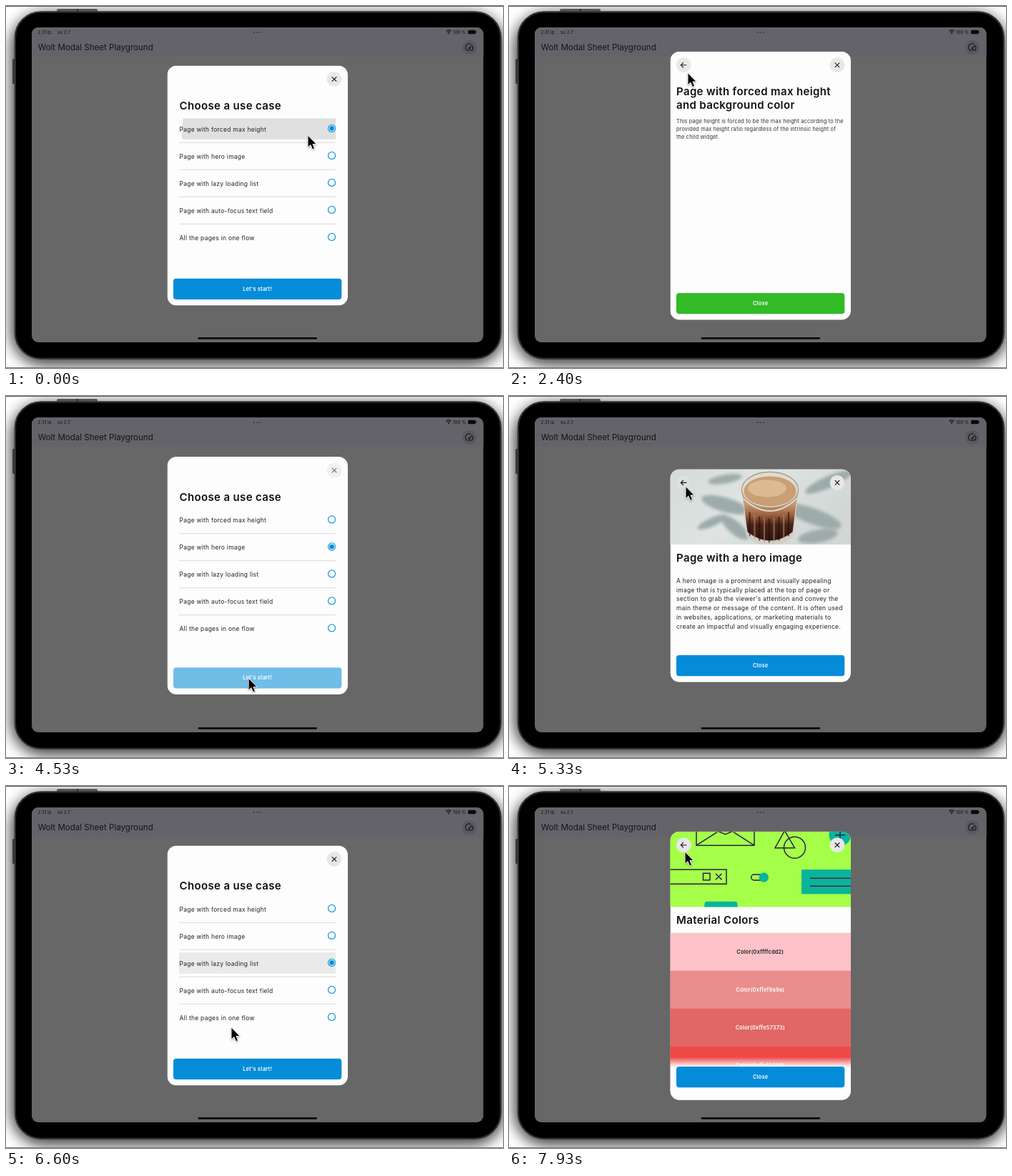
Animation, 695 px wide and 507 px high, one loop 8 s. Source, as an HTML page:

```html
<!DOCTYPE html>
<html lang="en">
<head>
<meta charset="utf-8">
<title>Modal sheet playground</title>
<style>
html, body { margin: 0; width: 100%; height: 100%; overflow: hidden; background: #fff; }
svg { display: block; width: 695px; height: 507px; }
text { font-family: Inter, "Open Sans", sans-serif; fill: #222; white-space: pre; }
.title { font-size: 15px; font-weight: 600; letter-spacing: .36px; fill: #111; }
.body { font-size: 8.45px; letter-spacing: .285px; }
.small { font-size: 7.4px; letter-spacing: .16px; fill: #333; }
.label { font-size: 7.4px; font-weight: 600; letter-spacing: .2px; text-anchor: middle; fill: #fff; }
.status { font-size: 6.2px; fill: #111; }
.ink { fill: none; stroke: #2a2146; stroke-width: 1.5; }
.icon { fill: none; stroke: #111; stroke-width: 1.15; }
</style>
</head>
<body>
<svg id="stage" viewBox="0 0 695 507"></svg>
<script>
const LOOP = 8000, TICK = 1000 / 15;
const LEFT = 225.5, WIDTH = 252.5;
const BLUE = '#048cd8', TEAL = '#08b59b';

// Markup helpers
const rect = (x, y, w, h, fill, r = 0, more = '') =>
  `<rect x="${x}" y="${y}" width="${w}" height="${h}" rx="${r}" fill="${fill}" ${more}/>`;
const circle = (x, y, r, fill, more = '') =>
  `<circle cx="${x}" cy="${y}" r="${r}" fill="${fill}" ${more}/>`;
const oval = (x, y, rx, ry, fill, more = '') =>
  `<ellipse cx="${x}" cy="${y}" rx="${rx}" ry="${ry}" fill="${fill}" ${more}/>`;
const path = (d, cls, more = '') => `<path d="${d}" class="${cls}" ${more}/>`;
const text = (x, y, cls, s, more = '') => `<text x="${x}" y="${y}" class="${cls}" ${more}>${s}</text>`;
const lines = (x, y, step, cls, list) => list.map((s, i) => text(x, y + i * step, cls, s)).join('');

const closeIcon = circle(459, 19, 10.4, '#e7e7e8') + path('M455.8 15.8l6.4 6.4m0-6.4l-6.4 6.4', 'icon');
const backIcon = fill => circle(244.3, 19, 10.4, fill) + path('M248.3 19h-8m3.6-3.6l-3.6 3.6l3.6 3.6', 'icon');
const button = (s, fill, gap = 8.5) =>
  rect(234, -gap - 29.2, 235.3, 29.2, fill, 4) + text(351.6, -gap - 12, 'label', s);

const ROWS = ['Page with forced max height', 'Page with hero image', 'Page with lazy loading list',
  'Page with auto-focus text field', 'All the pages in one flow'];

const listMain = text(242.5, 61.8, 'title', 'Choose a use case') + ROWS.map((s, i) => {
  const y = 38 * i;
  return (i < 3 ? `<clipPath id="row${i}">${rect(242, 73.7 + y, 219, 29.6, '#000')}</clipPath>
    <g clip-path="url(#row${i})">${circle(0, 0, 0, '#000', `id="ripple${i}"`)}</g>` : '') +
    text(242.5, 92 + y, 'body', s) +
    circle(455.5, 87.9 + y, 5, '#fff', 'stroke="#1b9bd7" stroke-width="1.3"') +
    circle(455.5, 87.9 + y, 3.3, BLUE, `id="dot${i}"`) +
    (i < 4 ? rect(242, 107.3 + y, 219, .8, '#cfcfcf') : '');
}).join('');

const forcedMain = lines(234, 61, 19.3, 'title', ['Page with forced max height', 'and background color']) +
  lines(234, 100.7, 10.6, 'small', ['This page height is forced to be the max height according to the',
    'provided max height ratio regardless of the intrinsic height of', 'the child widget.']);

const leaf = (x, y, rx, ry, turn) => oval(x, y, rx, ry, '#9dabaa', `transform="rotate(${turn} ${x} ${y})"`);
const ridges = Array.from({ length: 9 }, (_, i) =>
  rect(335.5 + i * 6.8, 60 + 9 * Math.sin(i * Math.PI / 8), 2.2, 34, i % 2 ? '#b98a6a' : '#24100c', 1, 'opacity=".6"')).join('');
const photo = `<clipPath id="photo">${rect(225, 0, 254, 105.7, '#000')}</clipPath><g clip-path="url(#photo)">` +
  rect(225, 0, 254, 106, 'url(#wall)') +
  `<g filter="url(#soft)">` + leaf(302, 50, 34, 10, 16) + leaf(316, 82, 24, 9, 40) + leaf(284, 74, 22, 6, -24) +
  leaf(425, 66, 42, 11, 20) + leaf(447, 18, 36, 8, -24) + leaf(432, 94, 28, 9, -10) + leaf(302, 14, 24, 6, -10) + '</g>' +
  path('M325.5 30L332 94Q365 122 398 94L404.5 30Z', '', 'fill="#d3cfc7"') +
  path('M327 36L333.5 88Q365 112 396.5 88L403 36Z', '', 'fill="url(#coffee)"') + ridges +
  oval(365, 29, 39.5, 25, '#e0dad0', 'stroke="#a2917f" stroke-width="1.2"') +
  oval(365, 31, 36.5, 21, '#c99f74') + oval(361, 27, 27, 12, '#dcbb93') +
  path('M327.5 41Q365 76 402.5 41', '', 'fill="none" stroke="#e3d5c2" stroke-width="2"') + '</g>';
const heroMain = photo + text(234, 129.4, 'title', 'Page with a hero image') +
  lines(234, 159.7, 12.7, 'body', ['A hero image is a prominent and visually appealing',
    'image that is typically placed at the top of page or', "section to grab the viewer's attention and convey the",
    'main theme or message of the content. It is often used', 'in websites, applications, or marketing materials to',
    'create an impactful and visually engaging experience.']);

const art = `<clipPath id="art">${rect(225, 0, 254, 105.7, '#000')}</clipPath><g clip-path="url(#art)">` +
  rect(225, 0, 254, 106, '#a5ff49') +
  path('M262 -9V19.5H343V-9M262 19.5L291 1M343 19.5L314 1M274 -8L302.5 4L331 -8', 'ink') +
  path('M385.5 -1L372 23H399.5Z', 'ink') + circle(399.5, 22.5, 15, 'none', 'class="ink"') +
  circle(463, 4.5, 15.5, TEAL) + path('M463 -3V11M456 5H470', 'ink') +
  path('M220 53.3H304V73.5H220M271.5 58.5h9.5v9.5h-9.5zM289 59l8.5 8.5m0-8.5l-8.5 8.5', 'ink') +
  `<rect x="338.7" y="60.4" width="21" height="7.8" rx="3.9" class="ink"/>` + circle(356.3, 64.3, 6.7, TEAL) +
  rect(409, 53.3, 72, 34.3, TEAL) + path('M421 65.5H480M421 76.5H480', '', 'stroke="#55243a" stroke-width="1.5"') +
  rect(273.3, 98, 46.3, 20, TEAL, 4) + '</g>';
const REDS = [['#fdc3c9', 'ffffcdd2'], ['#e98d8d', 'ffef9a9a'], ['#e06766', 'ffe57373'], ['#ef4947', 'ffef5350']];
const lazyMain = art + text(234, 129.2, 'title', 'Material Colors') + REDS.map(([fill, hex], i) =>
  rect(225, 142 + 52.9 * i, 254, 53.2, fill) +
  text(351.3, 171.2 + 52.9 * i, 'label', `Color(0x${hex})`, i ? '' : 'style="fill:#222"')).join('');
const lazyBar = rect(225, -60, 254, 14, 'url(#fade)') + rect(225, -46.2, 254, 47, '#fdfdfd') + button('Close', BLUE, 17.4);

const GREY = '#e7e7e8';
const PAGES = [
  { top: 83.5, bottom: 419.5, bg: '#fdfdfd', main: listMain, nav: closeIcon, bar: button("Let's start!", BLUE) },
  { top: 63.7, bottom: 439.7, bg: '#e6f8e5', main: forcedMain, nav: backIcon(GREY) + closeIcon, bar: button('Close', '#22b615') },
  { top: 102.4, bottom: 400.8, bg: '#fdfdfd', main: heroMain, nav: backIcon('#dbe1de') + closeIcon, bar: button('Close', BLUE) },
  { top: 63.7, bottom: 439.7, bg: '#fdfdfd', main: lazyMain, nav: backIcon(GREY) + closeIcon, bar: lazyBar }
];

const device = rect(0, 0, 695, 507, '#fff') +
  rect(7, 10, 690, 493, '#000', 46, 'opacity=".75" filter="url(#shadow)"') +
  rect(0, 0, 695, 1, '#555') + rect(0, 506, 695, 1, '#777') +
  rect(71, 4, 57, 5, '#55565a', 2) + rect(99, 4, 1.5, 4, '#222') + rect(9, 74, 5, 35, '#3b3b3e', 1.5) +
  rect(12.8, 8.3, 679, 485.5, '#000', 36, 'stroke="#303134" stroke-width="2.2"') +
  rect(36, 30, 631.5, 441, '#676767', 9) +
  path('M36 71V39a9 9 0 0 1 9-9H658.5a9 9 0 0 1 9 9V71Z', '', 'fill="#65636a"') +
  text(44.5, 38.7, 'status', '2.31 ip.') + text(72, 38.7, 'status', 'su 2.7.') +
  [347, 351.3, 355.6].map(x => circle(x, 37, 1.1, '#38373b')).join('') +
  path('M615.6 35.2q3.4-3 6.8 0M616.9 36.9q2.1-1.8 4.2 0', 'icon') + circle(619, 38.4, .9, '#111') +
  text(625, 38.7, 'status', '100 %') + rect(646, 33.7, 10.8, 5.6, '#0a0a0a', 1.6) + rect(657.3, 35.4, 1, 2.2, '#222') +
  text(44.7, 61.8, '', 'Wolt Modal Sheet Playground', 'font-size="11.55" style="fill:#151515"') +
  circle(648, 58, 10.2, '#5b595f') +
  path('M644.6 62h6.9a5 5 0 0 0 .8-6M650 53.6a5 5 0 0 0-5.4 8.4M648 59.4l3.8-4.6', 'icon') +
  circle(648, 59.3, 1.2, '#111') + rect(268.5, 464, 166.5, 2.7, '#0b0b0b', 1.3);

const stop = (at, color, more = '') => `<stop offset="${at}" stop-color="${color}" ${more}/>`;
const defs = `<defs>
  <filter id="shadow" x="-10%" y="-10%" width="120%" height="120%"><feGaussianBlur stdDeviation="10"/></filter>
  <filter id="soft"><feGaussianBlur stdDeviation="2.2"/></filter>
  <linearGradient id="wall" x2="1" y2=".4">${stop(0, '#d3dad7')}${stop(.5, '#dfe4e1')}${stop(1, '#d0d7d4')}</linearGradient>
  <linearGradient id="coffee" x2="0" y2="1">${stop(.2, '#c49a72')}${stop(.45, '#9a5f3c')}${stop(.65, '#4a2218')}${stop(1, '#2e1510')}</linearGradient>
  <linearGradient id="fade" x2="0" y2="1">${stop(0, '#fdfdfd', 'stop-opacity="0"')}${stop(1, '#fdfdfd')}</linearGradient>
  <clipPath id="clip"><rect id="clipBox" x="${LEFT}" width="${WIDTH}" rx="13"/></clipPath></defs>`;

document.getElementById('stage').innerHTML = defs + device +
  `<g clip-path="url(#clip)"><rect id="sheet" x="${LEFT}" width="${WIDTH}"/>` + PAGES.map((p, i) =>
    `<g id="page${i}"><g id="main${i}">${p.main}</g><g id="bar${i}">${p.bar}</g><g id="nav${i}">${p.nav}</g></g>`).join('') + '</g>' +
  `<g id="cursor"><path d="M0 0V17.2L3.9 13.6L6.6 19.9L9.6 18.6L7 12.5H12.2Z" fill="#000" stroke="#fff"
    stroke-width="1" stroke-linejoin="round" style="filter:drop-shadow(0 1px 1px rgba(0,0,0,.35))"/></g>`;

// Motion tables
const TURNS = [[1033, 0, 1], [2390, 1, 0], [4476, 0, 2], [5505, 2, 0], [7115, 0, 3]]; // start, from, to
const TAPS = [[-200, 422, 181], [3250, 280, 212], [6330, 276, 252]]; // time, x, y; one per row
const MOVES = [[0, 422, 181], [70, 422, 181], [700, 343, 393], [1600, 343, 393], [2300, 250, 93.5], [2560, 250, 93.5],
  [3100, 280, 212], [3380, 280, 212], [4000, 338, 393], [4200, 339, 395], [4680, 339, 395], [5200, 246, 134],
  [5330, 247, 126.5], [5640, 247, 126.5], [6200, 276, 252], [6420, 276, 252], [6734, 340, 393], [7250, 340, 393],
  [7860, 246, 92], [8000, 246, 92]];

const $ = id => document.getElementById(id);
const set = (id, attrs) => { for (const k in attrs) $(id).setAttribute(k, attrs[k]); };
const span = (v, a, b) => Math.min(1, Math.max(0, (v - a) / (b - a)));
const mix = (a, b, k) => a + (b - a) * k;
const smooth = k => k * k * (3 - 2 * k);

// cubic-bezier(.4, 0, .2, 1)
function ease(x) {
  let lo = 0, hi = 1, s = .5;
  for (let i = 0; i < 20; i++) {
    s = (lo + hi) / 2;
    if (1.2 * s * (1 - s) ** 2 + .6 * s * s * (1 - s) + s ** 3 < x) lo = s; else hi = s;
  }
  return 3 * s * s * (1 - s) + s ** 3;
}

function place(i, top, bottom, x, mainAlpha, barAlpha) {
  set('page' + i, { display: 'inline' });
  set('main' + i, { transform: `translate(${x} ${top})`, opacity: mainAlpha });
  set('nav' + i, { transform: `translate(0 ${top})`, opacity: barAlpha });
  set('bar' + i, { transform: `translate(0 ${bottom})`, opacity: barAlpha });
}

function draw(t) {
  const [start, from, to] = TURNS.filter(s => s[0] <= t).pop() || [-1000, 0, 0];
  const u = t - start, k = ease(span(u, 0, 350));
  const top = mix(PAGES[from].top, PAGES[to].top, k), bottom = mix(PAGES[from].bottom, PAGES[to].bottom, k);
  const box = { y: top, height: bottom - top };
  set('clipBox', box);
  set('sheet', { ...box, fill: PAGES[to].bg });

  const slide = ease(span(u, 75, 340)), way = to ? 1 : -1;
  PAGES.forEach((_, i) => set('page' + i, { display: 'none' }));
  if (u < 150) place(from, top, bottom, -70 * way * slide, 1 - span(u, 80, 150), 1 - span(u, 0, 132));
  if (u >= 150) place(to, top, bottom, 70 * way * (1 - slide), span(u, 140, 330), span(u, 140, 320));

  const picked = TAPS.filter(s => s[0] + 50 <= t).length - 1;
  ROWS.forEach((_, i) => set('dot' + i, { opacity: i === picked ? 1 : 0 }));
  TAPS.forEach(([at, x, y], i) => {
    const age = t - at;
    set('ripple' + i, { cx: x, cy: y - PAGES[0].top, r: Math.min(300, Math.max(0, age * .88)),
      opacity: .115 * (1 - span(age, 200, 400)) });
  });

  const n = Math.max(1, MOVES.findIndex(m => m[0] > t));
  const [a, b] = [MOVES[n - 1], MOVES[n]], m = smooth(span(t, a[0], b[0]));
  set('cursor', { transform: `translate(${mix(a[1], b[1], m)} ${mix(a[2], b[2], m)})` });
}

const origin = performance.now();
function frame(now) {
  const t = Math.max(0, now - origin) % LOOP;
  draw(Math.min(LOOP - 1, Math.floor((t + 5) / TICK) * TICK));
  requestAnimationFrame(frame);
}
draw(0);
requestAnimationFrame(frame);
</script>
</body>
</html>
```
